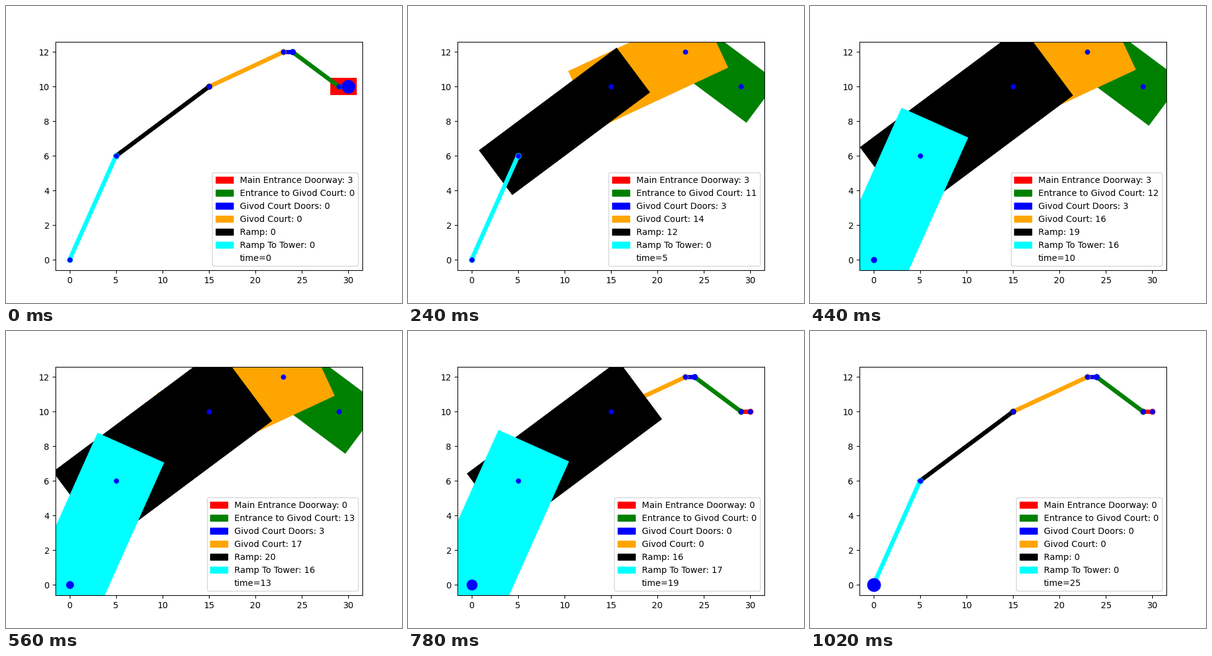
Write a matplotlib script that moves like this. It is 640x480 px and loops after 1.04 s.

```python
import matplotlib.pyplot as plt
import numpy as np
from matplotlib.animation import FuncAnimation
from matplotlib.patches import Patch

PEOPLE = 100
FRAMES = 52
DOOR_WIDTH = 3  # people who fit in the first doorway at once

NODES = [(30, 10), (29, 10), (24, 12), (23, 12), (15, 10), (5, 6), (0, 0)]
# name, colour, frames a person needs to walk it
ROADS = [
    ("Main Entrance Doorway", "red", 0),
    ("Entrance to Givod Court", "green", 3.2),
    ("Givod Court Doors", "blue", 0.85),
    ("Givod Court", "orange", 4.35),
    ("Ramp", "black", 5.5),
    ("Ramp To Tower", "cyan", 4.6),
]

# Everyone passes the doorway in turn; latecomers walk more slowly the further they go.
person = np.arange(PEOPLE) + 0.5
enter = 0.31 * person * (1 - person / 1000)
walk = np.cumsum([frames for *_, frames in ROADS])[:, None]
leave = enter + walk + 0.012 * walk**2 * (person / PEOPLE) ** 3


def flow(frame):
    """People who have entered the first road, then left each road."""
    left = [int(n) for n in (leave <= frame).sum(axis=1)]
    return [min(PEOPLE, left[0] + DOOR_WIDTH)] + left


fig, ax = plt.subplots(figsize=(6.4, 4.8), dpi=100)
ax.set_xlim(-1.5, 31.5)
ax.set_ylim(-0.6, 12.6)

# Each road lies over the node before it, so roads and nodes alternate.
roads, dots = [], []
for i, (_, color, _) in enumerate(ROADS):
    roads += ax.plot(*zip(NODES[i], NODES[i + 1]), "o-", color=color, lw=5)
    dots += ax.plot(*NODES[i], "o", color="blue", ms=5)
dots += ax.plot(*NODES[-1], "o", color="blue", ms=5)


def draw(frame):
    passed = flow(frame)
    handles = []
    for i, (name, color, _) in enumerate(ROADS):
        count = passed[i] - passed[i + 1]
        roads[i].set_linewidth(5 + 5 * count)
        handles.append(Patch(color=color, label=f"{name}: {count}"))
    dots[0].set_markersize(5 + 0.1 * (PEOPLE - passed[0]))
    dots[-1].set_markersize(5 + 0.1 * passed[-1])
    handles.append(Patch(color="white", label=f"time={int(0.49 * frame + 0.09)}"))
    legend = ax.legend(handles=handles, loc="lower right")
    return roads + dots + [legend]


anim = FuncAnimation(fig, draw, frames=FRAMES, interval=20, repeat=True)
plt.show()
```
